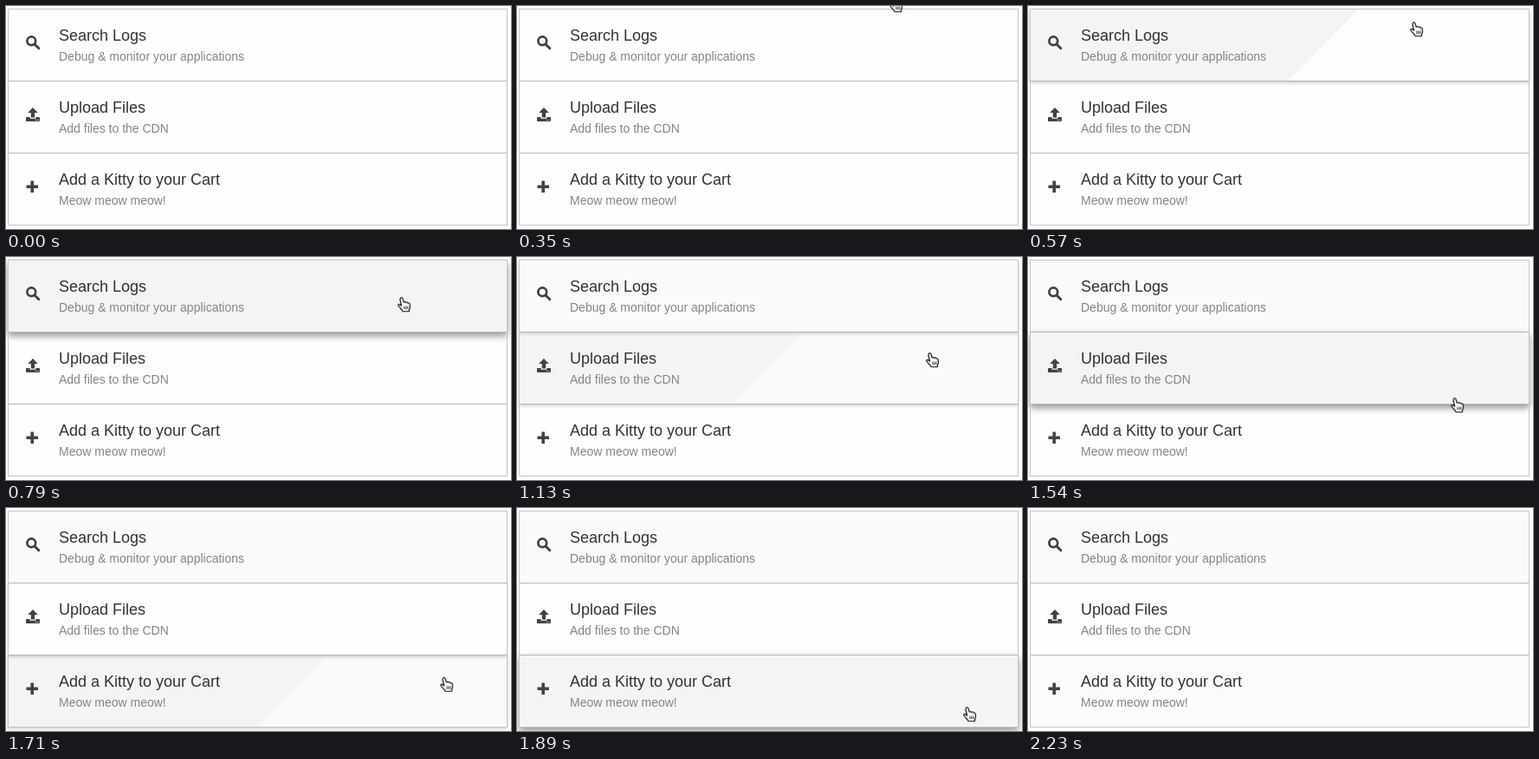
These frames come from a looping animation (583 px wide and 257 px high, 3280 ms). An HTML page:

```html
<!DOCTYPE html>
<html lang="en">
<head>
<meta charset="utf-8">
<title>Action list</title>
<style>
  html, body { margin: 0; width: 100%; height: 100%; overflow: hidden; background: #fff; }
  #stage { position: relative; width: 583px; height: 257px; overflow: hidden; }
  .row, .shade { position: absolute; left: 2px; width: 577px; height: 84px; }
  .row { background: #fefefe; }
  .ripple { width: 100%; height: 100%; background: #f4f4f4; }
  svg { position: absolute; left: 0; top: 0; }
  text { font-family: "Liberation Sans", Arial, Helvetica, sans-serif; }
  .title { font-size: 18px; fill: #333; }
  .note { font-size: 14px; fill: #858585; }
</style>
</head>
<body>
<div id="stage">
  <svg id="art" width="583" height="257" viewBox="0 0 583 257">
    <path d="M2.5 3.5H578.5V252.5H2.5Z" fill="none" stroke="#c2c4c4"/>
    <path d="M3 86.5H578M3 169.5H578" stroke="#b6b6b6"/>
    <g fill="#424242">
      <circle cx="29.3" cy="40.3" r="4.9" fill="none" stroke="#424242" stroke-width="2.7"/>
      <path d="M33 44L37.8 48.8" stroke="#424242" stroke-width="3" stroke-linecap="round"/>
      <path d="M31 117L36.8 123H33.2V128.5H28.8V123H25.2Z"/>
      <path fill-rule="evenodd" d="M24 128H27.6V129.7H34.4V128H38Q39 128 39 129V132Q39 133 38 133H24Q23 133 23 132V129Q23 128 24 128ZM34 131V132H35V131ZM36.4 131V132H37.4V131Z"/>
      <path d="M28.4 201.5H32V206.4H37V210H32V215H28.4V210H23.5V206.4H28.4Z"/>
    </g>
    <g id="labels"></g>
    <g id="hand" stroke="#111" stroke-width="1.2" stroke-linejoin="round">
      <path fill="#fff" d="M3.2 1.6C4.2.2 5.6.6 6 2L7.2 6C8 5.2 9.2 5.4 9.6 6.3C10.5 5.6 11.7 6 12 7C13 6.6 14 7.2 14.2 8.4L14.4 11.5C14.4 13 13.2 14 13.2 16.5H6C5.6 14.5 3 13 1 10C.2 8.8 1.6 7.6 3 8.8L4.6 10L3 3.5C2.8 2.6 2.8 2.1 3.2 1.6Z"/>
      <path fill="none" stroke-width=".9" d="M7.8 10.5V14M9.8 10.5V14M11.8 10.5V14"/>
    </g>
  </svg>
</div>
<script>
const LOOP = 3280, GROW = 240, FADE = 225, PITCH = 83;
const rows = [
  { title: "Search Logs", note: "Debug & monitor your applications",
    enter: 433, leave: 1005, hover: "#fdfdfd", after: "#fafafa" },
  { title: "Upload Files", note: "Add files to the CDN",
    enter: 1012, leave: 1577, hover: "#fafafa", after: "#fefefe" },
  { title: "Add a Kitty to your Cart", note: "Meow meow meow!",
    enter: 1577, leave: 2005, hover: "#fafafa", after: "#fbfbfb" },
];
// Time, x and y of the pointer
const route = [[0, 430, -40], [350, 430, -40], [350, 430, -10], [570, 441, 18], [790, 452, 46],
  [1130, 472, 110], [1540, 488, 162], [1890, 515, 229], [2060, 528, 262], [LOOP, 528, 262]];

const stage = document.getElementById("stage");
const art = document.getElementById("art");
const labels = document.getElementById("labels");

function play(element, property, steps) {
  const frames = steps.map(([time, value]) => ({ offset: time / LOOP, [property]: value }));
  element.animate(frames, { duration: LOOP, iterations: Infinity });
}

function addBox(className, y, parent = stage) {
  const box = document.createElement("div");
  box.className = className;
  box.style.top = y + "px";
  parent === stage ? stage.insertBefore(box, art) : parent.append(box);
  return box;
}

function addText(className, y, content) {
  const text = document.createElementNS("http://www.w3.org/2000/svg", "text");
  text.setAttribute("class", className);
  text.setAttribute("x", 61);
  text.setAttribute("y", y);
  text.textContent = content;
  labels.append(text);
}

const slant = (left, right) =>
  `polygon(${left}px 0px, ${right}px 0px, ${right - 83}px 100%, ${left - 83}px 100%)`;

rows.forEach(({ title, note, enter, leave, hover, after }, i) => {
  const y = 3 + i * PITCH;
  const row = addBox("row", y);
  const ripple = addBox("ripple", 0, row);
  addText("title", y + 37, title);
  addText("note", y + 60, note);

  const gone = leave + FADE;
  play(row, "backgroundColor", [[0, "#fefefe"], [enter, "#fefefe"], [enter + 80, hover],
    [leave, hover], [leave + 110, after], [LOOP, after]]);
  play(ripple, "clipPath", [[0, slant(0, 0)], [enter, slant(0, 0)],
    [enter + GROW, slant(0, 662)], [LOOP, slant(0, 662)]]);
  play(ripple, "opacity", [[0, 1], [leave, 1], [leave + 110, 0], [LOOP, 0]]);
});

rows.forEach(({ enter, leave }, i) => {
  const none = "0px 0px 0px rgba(0,0,0,0)", deep = "0px 4px 8px rgba(0,0,0,.42)";
  play(addBox("shade", 3 + i * PITCH), "boxShadow", [[0, none], [enter, none],
    [enter + 260, deep], [leave, deep], [leave + FADE, none], [LOOP, none]]);
});

play(document.getElementById("hand"), "transform",
  route.map(([time, x, y]) => [time, `translate(${x}px, ${y}px)`]));
</script>
</body>
</html>
```
